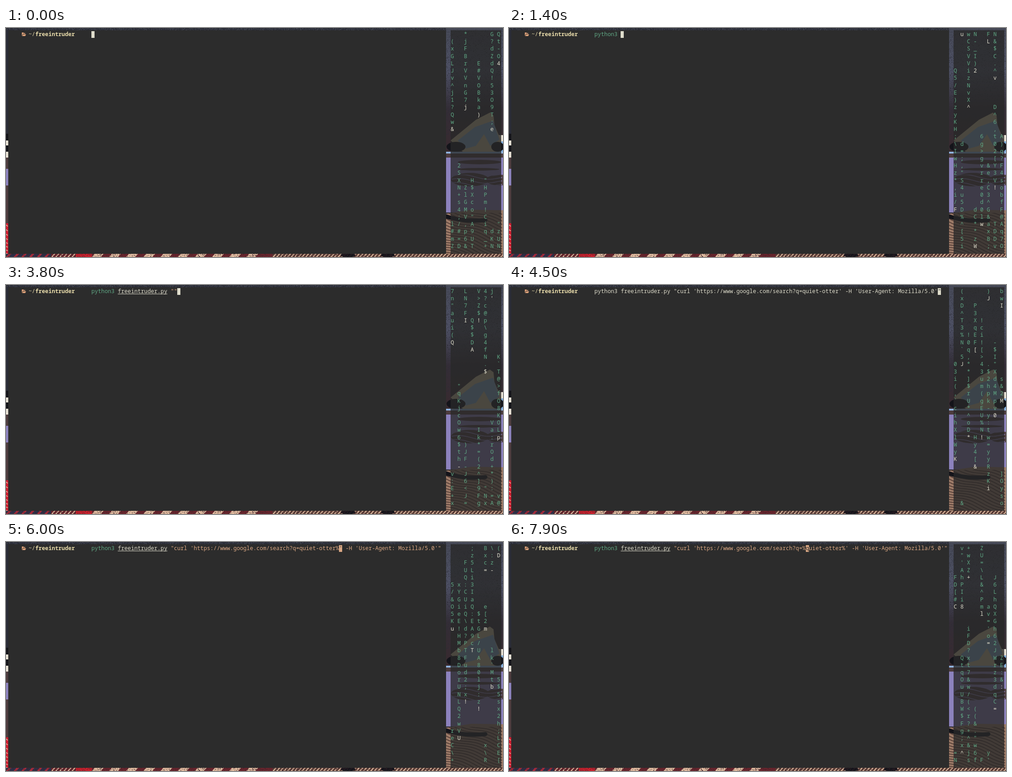
An HTML page with a canvas that plays this animation: 1100 px wide and 509 px high, repeating every 8 s.

```html
<!DOCTYPE html>
<html lang="en">
<head>
<meta charset="utf-8">
<title>Terminal and digital rain</title>
<style>
  html, body { margin: 0; width: 100%; height: 100%; overflow: hidden; background: #2a2c36; }
  canvas { display: block; }
</style>
</head>
<body>
<canvas id="stage" width="1100" height="509"></canvas>
<script>
const W = 1100, H = 509, LOOP = 8000, TICK = 100;
const CELL = 7.31, LINE = 16.24, BASE = 17.9, LEFT = 6.2;
const FONT = '12.18px "Noto Sans Mono", monospace';
const GREEN = '#5fa784', CREAM = '#dedccb', ORANGE = '#dba884', YELLOW = '#e9dcab', DARK = '#2c2c2c';
const PURPLE = '#8c82bd', BROWN = '#4d3c3e', TAN = '#dcb89d', MAROON = '#67242c', PALE = '#e6e0d4', INK = '#14141a';

const stage = document.getElementById('stage').getContext('2d');

function hash(a, b, c = 0) {
  let n = Math.imul(a + 11, 374761393) ^ Math.imul(b + 101, 668265263) ^ Math.imul(c + 7, 1274126177);
  n = Math.imul(n ^ (n >>> 13), 1103515245);
  return ((n ^ (n >>> 16)) >>> 0) / 4294967296;
}

// ---------- wallpaper ----------
function makeBackdrop() {
  const canvas = document.createElement('canvas');
  canvas.width = W;
  canvas.height = H;
  const g = canvas.getContext('2d');
  const rect = (color, x, y, w, h) => { g.fillStyle = color; g.fillRect(x, y, w, h); };
  const shape = (color, ...points) => {
    g.fillStyle = color;
    g.beginPath();
    points.forEach(([x, y]) => g.lineTo(x, y));
    g.fill();
  };
  const blob = (color, x, y, rx, ry) => {
    g.fillStyle = color;
    g.beginPath();
    g.ellipse(x, y, rx, ry, 0, 0, 7);
    g.fill();
  };
  const specks = (color, x, y, w, h, count) => {
    for (let i = 0; i < count; i++) rect(color, x + Math.floor(hash(i, x, y) * w), y + Math.floor(hash(i, y, w) * h), 1, 1);
  };
  const waves = (color, x, y, w, h, gap, slope) => {
    g.save();
    g.beginPath();
    g.rect(x, y, w, h);
    g.clip();
    g.strokeStyle = color;
    g.lineWidth = 1.6;
    for (let base = y - 60; base < y + h + 60; base += gap) {
      g.beginPath();
      for (let dx = 0; dx <= w; dx += 4)
        g.lineTo(x + dx, base + dx * slope + 4 * Math.sin((x + dx) / 17 + base / 23));
      g.stroke();
    }
    g.restore();
  };
  const hatch = (ground, line, from, to, step, width) => {
    rect(ground, from, 502, to - from, 7);
    for (let x = from; x < to - width; x += step)
      shape(line, [x + 6, 502], [x + 6 + width, 502], [x + width, H], [x, H]);
  };

  // sky
  const sky = g.createLinearGradient(0, 0, 0, 275);
  sky.addColorStop(0, '#464957');
  sky.addColorStop(0.35, '#4d5064');
  sky.addColorStop(0.65, '#332d36');
  sky.addColorStop(1, '#382a2f');
  rect('#2a2c36', 0, 0, W, H);
  rect(sky, 974, 0, 126, 275);
  specks('#41444f', 0, 0, W, 5, 1800);
  specks('#2b2c36', 974, 5, 126, 235, 2600);

  // left edge
  rect(INK, 0, 235, 5, 40);
  rect(PALE, 0, 250, 5, 11);
  rect(PALE, 0, 275, 5, 13);
  rect(BROWN, 0, 288, 5, 146);
  rect(PURPLE, 0, 313, 5, 37);
  rect('#cc1d30', 0, 434, 5, 75);
  waves(TAN, 0, 434, 5, 75, 9, 0.6);

  // mountain
  rect(PALE, 1086, 238, 14, 14);
  rect('#7fabda', 1078, 252, 22, 23);
  shape('#c6b791', [984, 250], [1040, 204], [1071, 188], [1079, 194], [1081, 216], [1096, 250], [1088, 276], [1012, 276]);
  shape('#82a3c4', [1000, 250], [1038, 220], [1078, 206], [1092, 248], [1072, 262], [1058, 236], [1040, 262], [1018, 268]);
  blob(INK, 996, 264, 21, 11);
  blob(INK, 1088, 264, 14, 11);

  // lake
  rect(PURPLE, 974, 275, 126, 135);
  rect('#8fb3de', 974, 275, 126, 4);
  rect(BROWN, 974, 279, 126, 9);
  blob(BROWN, 1048, 298, 48, 5);
  blob(BROWN, 1046, 314, 46, 3);
  blob(BROWN, 1027, 337, 42, 15);
  blob(BROWN, 1092, 338, 30, 12);
  waves('#8c82bd', 986, 326, 114, 26, 9, 0.04);

  // ploughed ground
  shape('#9d7b68', [974, 413], [1030, 404], [W, 405], [W, H], [974, H]);
  waves('#49342f', 974, 411, 126, 98, 6.5, 0.32);
  g.strokeStyle = INK;
  g.lineWidth = 9;
  g.lineCap = 'round';
  g.beginPath();
  g.moveTo(966, 416);
  g.quadraticCurveTo(1008, 432, 1061, 427);
  g.stroke();

  // bottom edge
  hatch('#2b3049', '#a52b3a', 0, 100, 17, 6);
  hatch(MAROON, TAN, 100, 190, 9, 3);
  rect('#c7202c', 155, 502, 36, 7);
  hatch(MAROON, TAN, 190, 590, 38, 20);
  hatch('#5d3f38', TAN, 590, W, 8, 3);
  blob(INK, 757, 505, 16, 5);
  blob(INK, 845, 505, 15, 5);
  specks('#3c2028', 0, 502, W, 7, 1100);

  // windows
  rect(DARK, 5, 5, 969, 497);
  rect('rgba(40,40,40,.78)', 984, 5, 112, 497);
  return canvas;
}
const backdrop = makeBackdrop();

// ---------- rain ----------
const COLUMNS = 8, ROWS = 30, ROWS_PER_MS = 0.0232;

// Streams of random length and spacing, measured in rows of travel.
function makeStreams(col) {
  const streams = [];
  let head = -ROWS - Math.floor(hash(col, 1) * 16);
  for (let i = 0; head < LOOP * ROWS_PER_MS; i++) {
    const length = 4 + Math.floor(hash(col, i, 2) * 20);
    streams.push({ head, length });
    head += length + 3 + Math.floor(hash(col, i, 3) * 20);
  }
  return streams;
}
const rain = Array.from({ length: COLUMNS }, (_, col) => makeStreams(col));

function drawRain(t) {
  const travel = Math.floor(t * ROWS_PER_MS);
  rain.forEach((streams, col) => streams.forEach(({ head, length }, i) => {
    const front = travel - head;
    for (let row = Math.max(0, front - length + 1); row <= Math.min(ROWS - 1, front); row++) {
      const glyph = String.fromCharCode(33 + Math.floor(hash(col, row, i) * 90));
      write(glyph, 984.3 + col * CELL * 2, row === front ? CREAM : GREEN, BASE + row * LINE);
    }
  }));
}

// ---------- command line ----------
const COMMAND = 'python3 ', FILE = 'freeintruder.py ';
const COMPLETED = 2200, QUOTED = 3300, PAIRED = 3700, PASTED = 4300;
const URL_HEAD = '"curl \'https://www.google.com/search?q=', QUERY = 'quiet-otter';
const URL_TAIL = '\' -H \'User-Agent: Mozilla/5.0\'"';

function write(text, x, color, y = BASE) {
  stage.fillStyle = color;
  stage.fillText(text, x, y);
}
const xOf = col => LEFT + col * CELL;
const glide = (t, t0, t1, a, b) => Math.round(a + (b - a) * Math.min(1, Math.max(0, (t - t0) / (t1 - t0))));

function argumentAt(t) {
  if (t < QUOTED) return { text: '', cursor: 0 };
  if (t < PAIRED) return { text: '"', cursor: 1 };
  if (t < PASTED) return { text: '""', cursor: t < 4100 ? 2 : 1 };
  const start = URL_HEAD.length, end = start + QUERY.length;
  const closed = t >= 6000, opened = t >= 7500;
  const text = URL_HEAD + (opened ? '%' : '') + QUERY + (closed ? '%' : '') + URL_TAIL;
  let cursor = glide(t, 4600, 5390, end + URL_TAIL.length - 1, end);
  if (closed) cursor = glide(t, 6850, 7150, end + 1, start);
  if (opened) cursor = start + 1;
  return { text, cursor };
}

function drawPrompt() {
  const fill = (...points) => {
    stage.fillStyle = '#dba078';
    stage.beginPath();
    points.forEach(([x, y]) => stage.lineTo(x, y));
    stage.fill();
  };
  fill([35, 18], [35, 10], [38.5, 10], [39.5, 11.3], [42.5, 11.3], [42.5, 13], [37.5, 13], [35.5, 17]);
  fill([38, 14], [44.5, 14], [42.5, 18], [36, 18]);
  write('~/', xOf(6), YELLOW);
  stage.font = 'bold ' + FONT;
  write('freeintruder', xOf(8), YELLOW);
  stage.font = FONT;
}

function drawCommand(t) {
  const command = COMMAND.slice(0, glide(t, 100, 1200, 0, COMMAND.length));
  const file = FILE.slice(0, t < COMPLETED ? glide(t, 1700, 2000, 0, 3) : FILE.length);
  const { text, cursor } = argumentAt(t);
  const plain = t >= 4400 && t < 4700; // highlighting returns after the paste
  write(command, xOf(25), plain ? CREAM : GREEN);
  write(file, xOf(33), CREAM);
  if (!plain) stage.fillRect(xOf(33), 19.5, file.trim().length * CELL, 1);
  write(text, xOf(49), plain ? CREAM : ORANGE);

  const under = text[cursor];
  const x = xOf(25 + command.length + file.length + cursor);
  stage.fillStyle = under && !plain ? ORANGE : CREAM;
  stage.fillRect(Math.round(x), 7, 7, 15);
  if (under) write(under, x, DARK);
}

// ---------- playback ----------
function render(now) {
  let t = Math.floor((now % LOOP) / TICK) * TICK;
  if (t > 2400 && t < 2800) t = 2400; // brief stall
  stage.drawImage(backdrop, 0, 0);
  stage.font = FONT;
  drawRain(t);
  drawPrompt();
  drawCommand(t);
}

const began = performance.now();
function loop() {
  render(performance.now() - began);
  requestAnimationFrame(loop);
}
loop();
</script>
</body>
</html>
```
